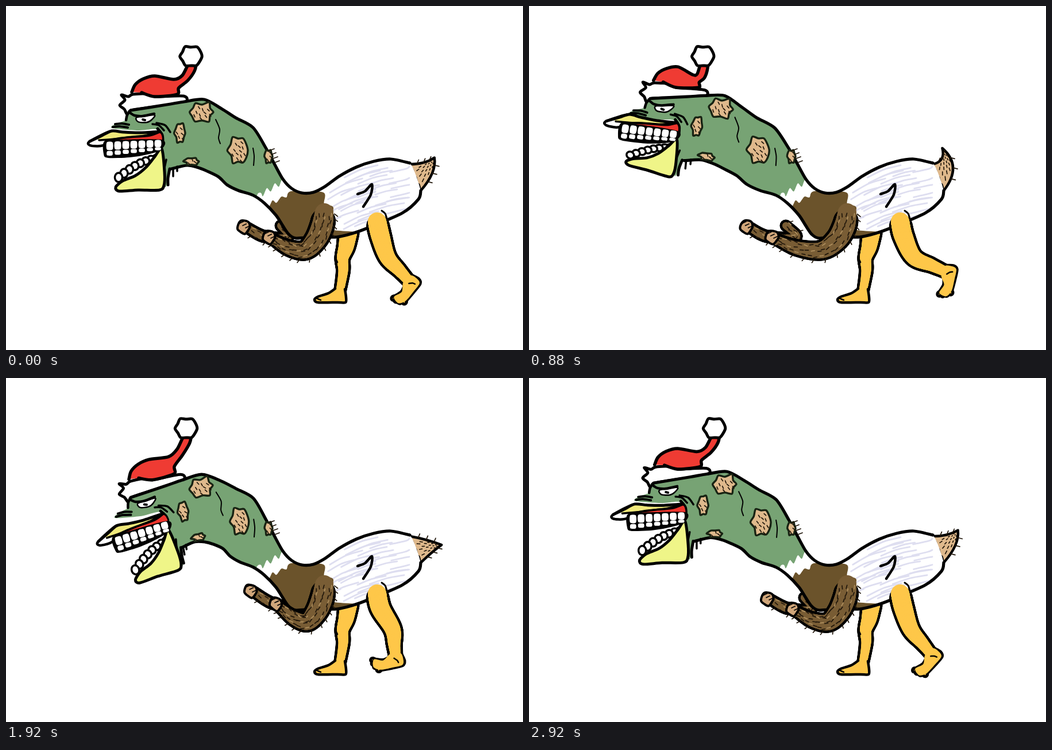
An HTML page with a canvas for the animation above (2960 ms loop, 900 by 600 pixels).

```html
<!DOCTYPE html>
<html lang="en">
<head>
<meta charset="utf-8">
<title>Festive duck</title>
<style>
html, body { margin: 0; width: 100%; height: 100%; overflow: hidden; background: #fff; }
canvas { display: block; }
</style>
</head>
<body>
<canvas id="stage" width="900" height="600"></canvas>
<script>
const ctx = document.getElementById('stage').getContext('2d');
const LOOP = 2960, STEP = 40, TAU = Math.PI * 2, RAD = Math.PI / 180;
const INK = '#000', GREEN = '#77a374', BROWN = '#6b532b', ARM = '#795d35', SKIN = '#dfb98c', ORANGE = '#fec749';

// The whole pose follows one phase angle
const pose = {};
function setPose(t) {
  const a = t / LOOP * TAU;
  const nod = Math.sin(a) - .22 * Math.sin(2 * a);
  const shin = 6 - 33 * Math.sin(a + .18);
  Object.assign(pose, {
    nod, shin,
    foot: 1.1 * shin - 44,
    shank: 57 * (1 - .004 * shin),
    pom: -12 - 12 * Math.sin(a - .87),
    reach: -22 * nod - 10 * nod * nod,
    raise: -20 * Math.max(0, Math.sin(a - 1.8)) ** 2
  });
}

const ease = u => { u = Math.min(1, Math.max(0, u)); return u * u * (3 - 2 * u); };
const mix = (p, q, w) => p.map((v, i) => v + (q[i] - v) * w);
const polar = (deg, r) => [r * Math.cos(deg * RAD), r * Math.sin(deg * RAD)];
const add = (p, q) => [p[0] + q[0], p[1] + q[1]];
function spin([x, y], [cx, cy], a) {
  const c = Math.cos(a), s = Math.sin(a);
  return [cx + (x - cx) * c - (y - cy) * s, cy + (x - cx) * s + (y - cy) * c];
}
function random(seed) {
  return () => (seed = (seed * 16807) % 2147483647) / 2147483647;
}

// Warps: resting point -> posed point
const still = p => p;
function head(p) {
  const h = pose.nod, up = h > 0;
  const [x, y] = spin(p, [300, 205], (up ? .1 : .165) * h);
  return [x - (up ? 8 : 3) * h, y - (up ? 11 : 12) * h];
}
const beak = p => head(spin(p, [268, 218], pose.nod * (pose.nod > 0 ? .05 : .1)));
function jaw([x, y]) {
  const h = pose.nod, drop = (y - 240) / 80;
  if (h < 0) return head(spin([x, y], [272, 240], .12 * h));
  return head([x - 4 * h * drop, y - h * drop * (6 + .18 * (268 - x))]);
}
function neck(p) {
  const [x, y] = p;
  const chin = ease((300 - x) / 25) * ease((y - 235) / 15);
  const w = 1 - ease((x + .4 * (y - 180) - 320) / 180);
  return mix(p, mix(head(p), jaw(p), chin), w);
}
function hat(p) {
  const d = Math.hypot(p[0] - 325, p[1] - 88);
  return mix([p[0] + pose.pom, p[1]], head(p), ease((d - 18) / 55));
}
function arm([x, y]) {
  const w = ease((560 - x) / 105) * ease((y - 340) / 40);
  return [x + pose.reach * w, y + pose.raise * w * (1 + (435 - x) / 100)];
}

// Drawing helpers
const points = str => str.split(' ').map(s => s.split(',').map(Number));
function curve(pts, closed) {
  const n = pts.length, path = new Path2D();
  const at = i => closed ? pts[(i + n) % n] : pts[Math.min(n - 1, Math.max(0, i))];
  path.moveTo(...pts[0]);
  for (let i = 0; i < (closed ? n : n - 1); i++) {
    const [a, b, c, d] = [at(i - 1), at(i), at(i + 1), at(i + 2)];
    path.bezierCurveTo(b[0] + (c[0] - a[0]) / 7, b[1] + (c[1] - a[1]) / 7,
      c[0] - (d[0] - b[0]) / 7, c[1] - (d[1] - b[1]) / 7, c[0], c[1]);
  }
  if (closed) path.closePath();
  return path;
}
function paint(path, fill, width, ink = INK) {
  if (fill) { ctx.fillStyle = fill; ctx.fill(path); }
  if (width) { ctx.strokeStyle = ink; ctx.lineWidth = width; ctx.stroke(path); }
}
const shape = (warp, fill, width, str, closed = true) => paint(curve(points(str).map(warp), closed), fill, width);
const lines = (warp, width, ...strs) => strs.forEach(s => shape(warp, null, width, s, false));
const hair = (p, q, ink = '#21170b') => paint(curve([p, q]), null, 1.7, ink);

function oval(x, y, rx, ry, n = 16, jag = 0, seed = 1) {
  const rnd = random(seed);
  return Array.from({ length: n }, (_, i) => {
    const k = 1 + jag * (i % 2 ? -rnd() : rnd()), a = i / n * TAU;
    return [x + rx * k * Math.cos(a), y + ry * k * Math.sin(a)];
  });
}
function zigzag(p, q, n, amp) {
  return Array.from({ length: n + 1 }, (_, i) => add(mix(p, q, i / n), [0, i % 2 ? amp : -amp]));
}

// Tapered limb stamped along joints of x, y, radius
function spine(joints, u) {
  const n = joints.length - 1, s = Math.min(n - 1e-6, u * n), i = Math.floor(s), f = s - i;
  const [a, b, c, d] = [joints[Math.max(0, i - 1)], joints[i], joints[i + 1], joints[Math.min(n, i + 2)]];
  return b.map((v, k) => v + f / 2 * (c[k] - a[k]
    + f * (2 * a[k] - 5 * v + 4 * c[k] - d[k] + f * (3 * (v - c[k]) + d[k] - a[k]))));
}
function limb(joints, fill, from = 0) {
  const stamp = (color, grow, start) => {
    ctx.fillStyle = color;
    for (let u = start; u <= 1; u += .012) {
      const [x, y, r] = spine(joints, u);
      ctx.beginPath();
      ctx.arc(x, y, r + grow, 0, TAU);
      ctx.fill();
    }
  };
  stamp(INK, 2.5, from);
  stamp(fill, -2, 0);
}
function furryArm(joints, count, from) {
  const posed = joints.map(([x, y, r]) => [...arm([x, y]), r]), rnd = random(31);
  limb(posed, ARM, from);
  for (let i = 0; i < count; i++) {
    const u = (i + rnd()) / count, [x, y, r] = spine(posed, u), next = spine(posed, Math.min(1, u + .02));
    const dir = Math.atan2(next[1] - y, next[0] - x) / RAD, side = (i % 3 - 1) * r * .6 + (rnd() - .5) * 5;
    const p = add([x, y], polar(dir + 90, side));
    hair(p, add(p, polar(dir + 30 * (rnd() - .5), 6)), i % 4 ? undefined : '#b0905f');
    if (i % 5) continue;
    const rim = add([x, y], polar(dir - 90, r));
    hair(rim, add(rim, polar(dir - 60, 7)));
  }
}
function fist(x, y) {
  paint(curve(oval(x, y, 10.5, 11.5, 9, .15, 5).map(arm), true), '#d0a67a', 4);
  for (let i = 0; i < 3; i++) {
    const p = arm([x - 7 + i * 5, y - 6 + i * 4]);
    hair(p, add(p, polar(-25, 7)), INK);
  }
}

function drawFarLeg() {
  limb(points('596,396,17 592,420,15 586,440,12 587,462,10.5 582,494,9').map(still), ORANGE);
  shape(still, ORANGE, 4.5, '573,493 561,501 543,507 537,512 543,517 577,517 591,517 592,508 590,494', false);
  lines(still, 2.5, '573,438 577,447', '548,513 541,510');
}

function drawNearLeg() {
  const knee = [664 + .25 * Math.abs(pose.shin), 438];
  const ankle = add(knee, polar(48 + pose.shin, pose.shank));
  const turn = p => spin(add(ankle, p), ankle, pose.foot * RAD);
  for (let i = 0; i < 4; i++) paint(curve(oval(-40 + i * i, 2 + i * 6, 4, 3.5).map(turn), true), ORANGE, 5);
  shape(turn, null, 5, '-9,-2 -22,3 -38,0', false);
  shape(turn, null, 5, '-28,21 -8,19 11,16 15,8 11,-4', false);
  limb([[646, 376, 18], [652, 402, 18], [...knee, 15.5], [...mix(knee, ankle, .55), 12.5], [...ankle, 10.5]], ORANGE, .1);
  shape(turn, ORANGE, 0, '-9,-6 -22,4 -38,1 -40,14 -28,20 -8,18 10,15 13,7 9,-6');
  lines(turn, 2.5, '-3,2 2,6 4,10');
  lines(still, 3, '654,357 660,362 663,371');
}

function drawFeathers() {
  const rnd = random(91);
  for (let i = 0; i < 38; i++) {
    const x = 552 + (i % 5) * 27 + rnd() * 14, y = 284 + Math.floor(i / 5) * 13 + rnd() * 9;
    const run = 30 + rnd() * 30, rise = run * (.48 - .36 * (x - 545) / 145);
    paint(curve([[x, y + rise / 2], [x + run / 2, y - rise * .15], [Math.min(702, x + run), y - rise / 2]]), null, 2.8, '#dedef0');
  }
}

function drawTail() {
  const h = pose.nod, tip = add([705, 300], polar(-41 - 31 * h, 54));
  const top = [703, 276], low = [722, 322], up = [729 - 3 * h, 276 - 5 * h], down = [750 + 5 * h, 290 - 10 * h];
  const path = new Path2D();
  path.moveTo(...top);
  path.quadraticCurveTo(...up, ...tip);
  path.quadraticCurveTo(...down, ...low);
  paint(path, SKIN, 4.5);
  const edge = (a, c, u) => mix(mix(a, c, u), mix(c, tip, u), u);
  for (let i = 1; i < 7; i++) {
    const a = edge(top, up, i / 8), b = edge(low, down, i / 8);
    for (let w = .25; w < .8; w += .25) {
      const p = mix(a, b, w + (i % 2 ? .05 : -.05));
      hair(p, mix(p, tip, .12));
    }
    if (i % 2) continue;
    hair(a, add(a, [3, -7]));
    hair(b, add(b, [8, 2]));
  }
  paint(curve(zigzag([702, 276], [721, 321], 7, 2.5)), null, 5);
}

const OUTLINE = '217,182 280,172 310,167 345,163 375,179 400,195 430,212 452,247 467,275 482,302 497,318 515,326 535,325 555,315 580,297 610,281 640,271 670,267 703,274';
const RUMP = '722,322 718,337 690,361 630,387 605,396 575,403 540,402 505,405 492,398 481,382 470,365 450,344 430,330 405,322 385,312 370,298 350,288 335,282 315,278 288,284';
const FACE = '278,316 273,290 271,240 264,216 230,217 185,213 190,206 209,199 212,190';

function drawBody() {
  const body = curve(points(OUTLINE + ' ' + RUMP + ' ' + FACE).map(neck), true);
  paint(body, '#fff');
  ctx.save();
  ctx.clip(body);
  drawFeathers();
  const brown = [...zigzag([462, 345], [497, 326], 4, 3), ...points('552,325 554,345 570,352 562,388 616,397 560,430 450,400')];
  paint(curve(brown, true), BROWN);
  const green = [...points('130,120 500,120 500,302'), ...zigzag([482, 306], [440, 331], 6, 5), ...points('400,350 130,350')];
  paint(curve(green.map(neck), true), GREEN);
  ctx.restore();
  lines(neck, 5.2, OUTLINE, RUMP);
  lines(still, 4.5, '612,328 625,323 637,311 635,329 622,350');
}

function drawPatch(x, y, rx, ry, seed) {
  paint(curve(oval(x, y, rx, ry, 12, .28, seed).map(neck), true), SKIN, 3.4, '#182313');
  const rnd = random(seed);
  for (let i = 0, n = rx * ry / 34; i < n; i++) {
    const r = .75 * Math.sqrt((i + .5) / n), p = add([x, y], [rx * r * Math.cos(i * 2.4), ry * r * Math.sin(i * 2.4)]);
    hair(neck(p), neck(add(p, polar(40 + 40 * rnd(), 4.5))));
  }
}

function drawPatches() {
  drawPatch(341, 185, 20, 16, 5);
  drawPatch(303, 222, 9, 17, 12);
  drawPatch(404, 252, 17, 24, 8);
  drawPatch(457, 262, 7, 12, 3);
  drawPatch(323, 271, 13, 6, 9);
  for (let i = 0; i < 4; i++) hair(neck([459 + i * 3, 252 + i * 7]), neck([467 + i * 3, 249 + i * 7]));
  lines(neck, 2, '365,198 372,215 370,230 373,240', '430,248 432,262 431,278');
}

function drawFace() {
  lines(neck, 5, '264,214 272,225 273,240', '282,312 282,300 285,284');
  lines(neck, 3.5, '291,297 291,285', '298,288 298,280', '276,282 279,268');
  shape(head, '#fff', 2.5, '228,194 258,190 254,198 245,203 230,202');
  lines(head, 4.5, '217,187 224,191 238,192 258,188', '217,182 211,190 209,199');
  lines(head, 4, '238,198 242,199', '190,206 202,205 214,207', '186,211 198,210 212,212');
  lines(head, 3.5, '255,206 266,208 275,217', '262,204 277,208 286,220');
}

function drawJaw() {
  for (let i = 7; i >= 0; i--) {
    const u = i / 7, x = 196 + 66 * u, y = 299 - 33 * u - 6 * Math.sin(u * 3);
    paint(curve(oval(x, y, 6.5, 8 - 2 * u).map(jaw), true), '#fff', 3.5);
  }
  shape(jaw, '#eff588', 5, '271,249 258,264 243,282 225,296 203,305 191,316 197,323 230,321 267,321 275,313 276,290');
}

function drawBeak() {
  shape(beak, '#fff', 4.5, '184,218 146,236 146,243 165,244 185,236');
  shape(beak, '#f0e97b', 0, '184,218 205,221 266,218 250,226 215,229 190,233 158,232');
  shape(beak, '#ee342c', 3, '175,236 200,230 240,226 268,220 271,236 235,234');
  shape(beak, INK, 4, '173,237 200,235 270,235 270,248 250,256 215,262 178,263 172,258');
  for (let i = 0; i < 7; i++) {
    const x = 180.5 + 14 * i, sag = i * .7;
    for (const [y, tall, wide] of [[244 - sag, 7.5 - i * .2, 6], [257 - sag * 1.9, 4.2 - i * .25, 5.4]]) {
      const tooth = oval(x, y, wide * 1.15, tall * 1.2, 8).map(([px, py]) =>
        [Math.max(x - wide, Math.min(x + wide, px)), Math.max(y - tall, Math.min(y + tall, py))]);
      paint(curve(tooth.map(beak), true), '#fff');
    }
  }
  lines(beak, 5, '268,219 232,221 205,220 184,218 165,227 146,236');
  lines(beak, 3.5, '162,234 190,232 215,229 250,226 267,220');
}

function drawHat() {
  shape(hat, '#fff', 5, '201,155 213,158 221,154 252,153 259,158 309,157 310,168 250,177 218,182 211,189 206,180 198,173 207,164');
  shape(hat, '#ef3b33', 5.5, '219,150 225,137 239,127 259,122 293,128 309,121 322,99 333,99 331,113 318,130 301,143 298,154 259,158 236,151', false);
  paint(curve(oval(325, 88, 19, 18, 12, .14, 4).map(hat), true), '#fff', 5);
}

function drawFarArm() {
  furryArm(points('478,383,8 491,403,8 450,402,9 419,386,8'), 24, 0);
  fist(414, 385);
}

function drawNearArm() {
  furryArm(points('554,360,18 550,384,20 539,408,19 520,426,16 492,422,13 466,408,9'), 62, .13);
  fist(458, 403);
}

function frame() {
  setPose(Math.floor(performance.now() / STEP) * STEP % LOOP);
  ctx.fillStyle = '#fff';
  ctx.fillRect(0, 0, 900, 600);
  ctx.lineCap = ctx.lineJoin = 'round';
  [drawFarLeg, drawFarArm, drawHat, drawTail, drawBody, drawPatches, drawNearLeg,
    drawFace, drawJaw, drawBeak, drawNearArm].forEach(draw => draw());
  requestAnimationFrame(frame);
}
frame();
</script>
</body>
</html>
```
